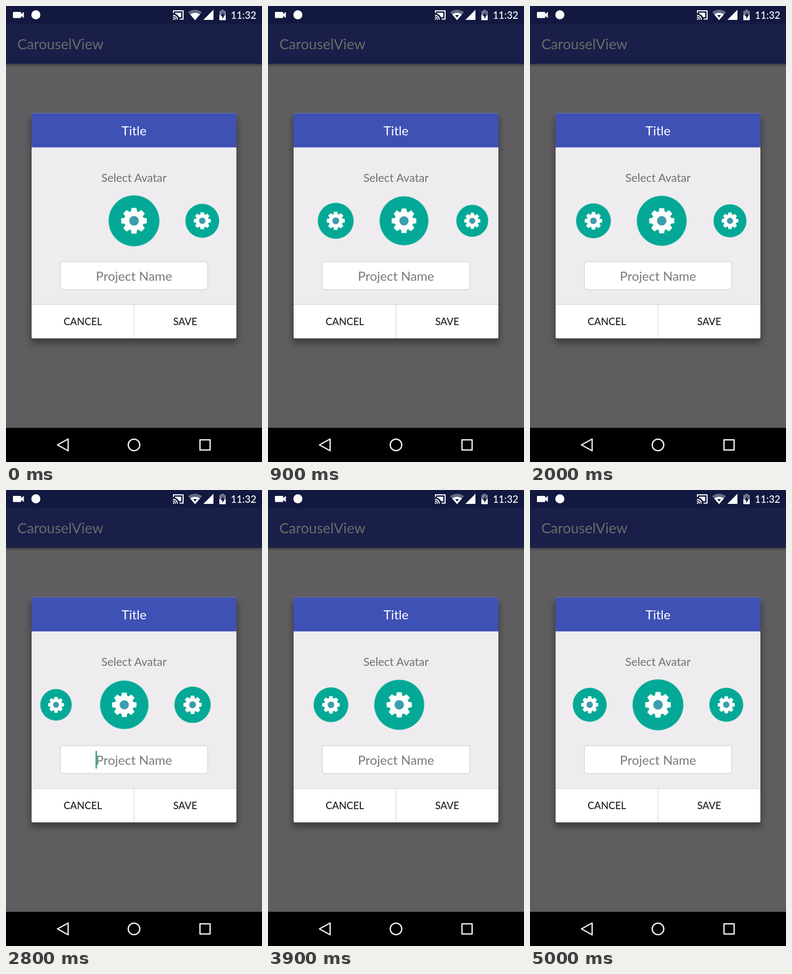
Recreate the animation shown at these times as an HTML page. Size 480 px wide and 853 px high, loop 5100 ms.

```html
<!DOCTYPE html>
<html lang="en">
<head>
<meta charset="utf-8">
<title>Avatar carousel</title>
<style>
html, body { margin: 0; width: 100%; height: 100%; overflow: hidden; background: #000; }
svg { display: block; width: 100%; height: 100%; font-family: Lato, "Open Sans", sans-serif; }
</style>
</head>
<body>
<svg viewBox="0 0 480 853">
  <defs>
    <filter id="shadow" x="-20%" y="-20%" width="140%" height="140%"><feGaussianBlur stdDeviation="6"/></filter>
    <linearGradient id="barShadow" x1="0" y1="0" x2="0" y2="1">
      <stop offset="0" stop-color="#000" stop-opacity=".32"/>
      <stop offset="1" stop-color="#000" stop-opacity="0"/>
    </linearGradient>
    <clipPath id="dialogClip"><rect x="48" y="200.5" width="384" height="421" rx="2.7"/></clipPath>
    <g id="avatar">
      <circle r="47.6" fill="#03a996" stroke="#63c9bd" stroke-width=".7"/>
      <g id="gear" fill="#fcfefe"><circle r="18.4"/></g>
      <circle r="9" fill="#3c9dac"/>
    </g>
  </defs>

  <rect width="480" height="853" fill="#5f5d5f"/>
  <rect width="480" height="34" fill="#12183f"/>
  <rect y="33.5" width="480" height="74.5" fill="#191f49"/>
  <rect y="108" width="480" height="6" fill="url(#barShadow)"/>
  <text x="21.3" y="81" font-size="26.67" fill="#6c6b69">CarouselView</text>

  <g fill="#fff">
    <path d="M14.5 11h12.500q1.500 0 1.500 1.500v2.500l5-4v11.500l-5-4v2.500q0 1.500-1.500 1.500h-12.500q-1.500 0-1.500-1.500v-8.500q0-1.500 1.500-1.500z"/>
    <circle cx="56" cy="16.500" r="8.500"/>
    <g fill="none" stroke="#fff" stroke-width="2">
      <path d="M314 13v-4h18v15.500h-6.500M313 17.200a8.300 8.300 0 0 1 8.300 8.300M313 20.800a4.700 4.700 0 0 1 4.700 4.700"/>
    </g>
    <path d="M313 23.300a2.500 2.500 0 0 1 2.500 2.500h-2.500zM317 12.500h11.500v8.500h-4q-2-5-7.500-6.500z"/>
    <path d="M354.500 26.500L341.500 11.500Q354.500 2.500 367.500 11.500Z" opacity=".36"/>
    <path d="M354.500 26.500L345.300 15.800Q354.500 9.500 363.700 15.800Z"/>
    <path id="activity" d="M351 17h7l-3.500 4.500z" fill="#12183f"/>
    <path d="M370 26L389 7V26Z"/>
    <path d="M403.500 7h5v2.300h3.500v7.700h-12v-7.700h3.500z" opacity=".42"/>
    <path d="M400 17h12v9.500h-12z"/>
    <path d="M407.500 11l-5 8h3v5.500l5-8h-3z" fill="#12183f"/>
    <text x="421.400" y="24" font-size="18.67" font-weight="500">11:32</text>
  </g>

  <rect x="46" y="209" width="388" height="422" rx="4" fill="#000" opacity=".34" filter="url(#shadow)"/>
  <g clip-path="url(#dialogClip)">
    <rect x="48" y="200" width="384" height="422" fill="#eeecef"/>
    <rect x="48" y="200" width="384" height="64.500" fill="#3f51b5"/>
    <g id="carousel"></g>
    <rect x="48" y="558" width="384" height="64" fill="#fff"/>
    <path d="M48 558.500h384M240 558.500v64" stroke="#dad9dc" stroke-width="1.300"/>
  </g>
  <rect x="102" y="478.300" width="276.300" height="52" rx="5" fill="#fff" stroke="#d3d2d6" stroke-width="1.300"/>
  <g text-anchor="middle">
    <text x="240" y="242" font-size="24" fill="#fff">Title</text>
    <text x="240" y="329" font-size="21.33" fill="#717073">Select Avatar</text>
    <text x="240" y="514" font-size="24" fill="#7b7a7b">Project Name</text>
    <g font-size="18.67" font-weight="500" fill="#1d1d1d">
      <text x="144" y="597">CANCEL</text>
      <text x="336" y="597">SAVE</text>
    </g>
  </g>
  <rect id="cursor" x="168" y="488" width="2.300" height="33" fill="#0a9a8b"/>

  <rect y="789" width="480" height="64" fill="#000"/>
  <g fill="none" stroke="#ececec" stroke-width="2.500" stroke-linejoin="round">
    <path d="M96.500 821L116.500 810V832Z"/>
    <circle cx="240" cy="821" r="10.800"/>
    <rect x="363.700" y="811.500" width="19" height="19"/>
  </g>
</svg>
<script>
const LOOP = 5100, STEP = 100, BLINK = 500;
const CENTER = 240, ROW_Y = 401.8, GAP = 128, COUNT = 4;
const $ = id => document.getElementById(id);

function add(parent, tag, attrs) {
  const el = document.createElementNS("http://www.w3.org/2000/svg", tag);
  for (const key in attrs) el.setAttribute(key, attrs[key]);
  return parent.appendChild(el);
}

for (let i = 0; i < 8; i++) {
  add($("gear"), "path", { d: "M-6.200 -15L-4.600 -24H4.600L6.200 -15Z", transform: `rotate(${i * 45})` });
}
const items = Array.from({ length: COUNT }, () => add($("carousel"), "use", { href: "#avatar" }));

// Scroll distance over time: three swipes forward, one back.
const swipes = [
  [0, 0], [300, 0], [500, 46], [900, 113], [1300, 128], [1500, 128],
  [1800, 212], [2000, 249], [2100, 251.5], [2600, 256], [2700, 256],
  [3000, 346], [3200, 383.5], [3400, 384], [3800, 384], [4300, 298],
  [4400, 279], [4600, 257], [4700, 251.5], [5000, 256], [LOOP, 256]
];

function slope(i) {
  const a = swipes[i], b = swipes[i + 1];
  return a && b ? (b[1] - a[1]) / (b[0] - a[0]) : 0;
}

// The harmonic mean keeps the curve free of false overshoot.
function tangent(i) {
  const a = slope(i - 1), b = slope(i);
  return a * b > 0 ? 2 * a * b / (a + b) : 0;
}

function scrollAt(t) {
  let i = 0;
  while (i < swipes.length - 2 && t >= swipes[i + 1][0]) i++;
  const [t0, x0] = swipes[i], [t1, x1] = swipes[i + 1];
  const span = t1 - t0, u = (t - t0) / span, v = 1 - u;
  return x0 * (1 + 2 * u) * v * v + x1 * (3 - 2 * u) * u * u
    + span * u * v * (tangent(i) * v - tangent(i + 1) * u);
}

function show(el, on) {
  el.setAttribute("visibility", on ? "visible" : "hidden");
}

function draw(time) {
  const t = Math.floor(time % LOOP / STEP) * STEP;
  const scroll = scrollAt(t);
  items.forEach((item, i) => {
    const offset = i * GAP - scroll;
    const scale = Math.max(0, 1 - Math.abs(offset) / (3 * GAP));
    item.setAttribute("transform", `translate(${CENTER + offset} ${ROW_Y}) scale(${scale})`);
  });
  show($("cursor"), t >= 400 && Math.floor((t - 400) / BLINK) % 2 === 0);
  show($("activity"), t >= 400);
}

const start = performance.now();
function tick() {
  draw(performance.now() - start);
  requestAnimationFrame(tick);
}
tick();
</script>
</body>
</html>
```
